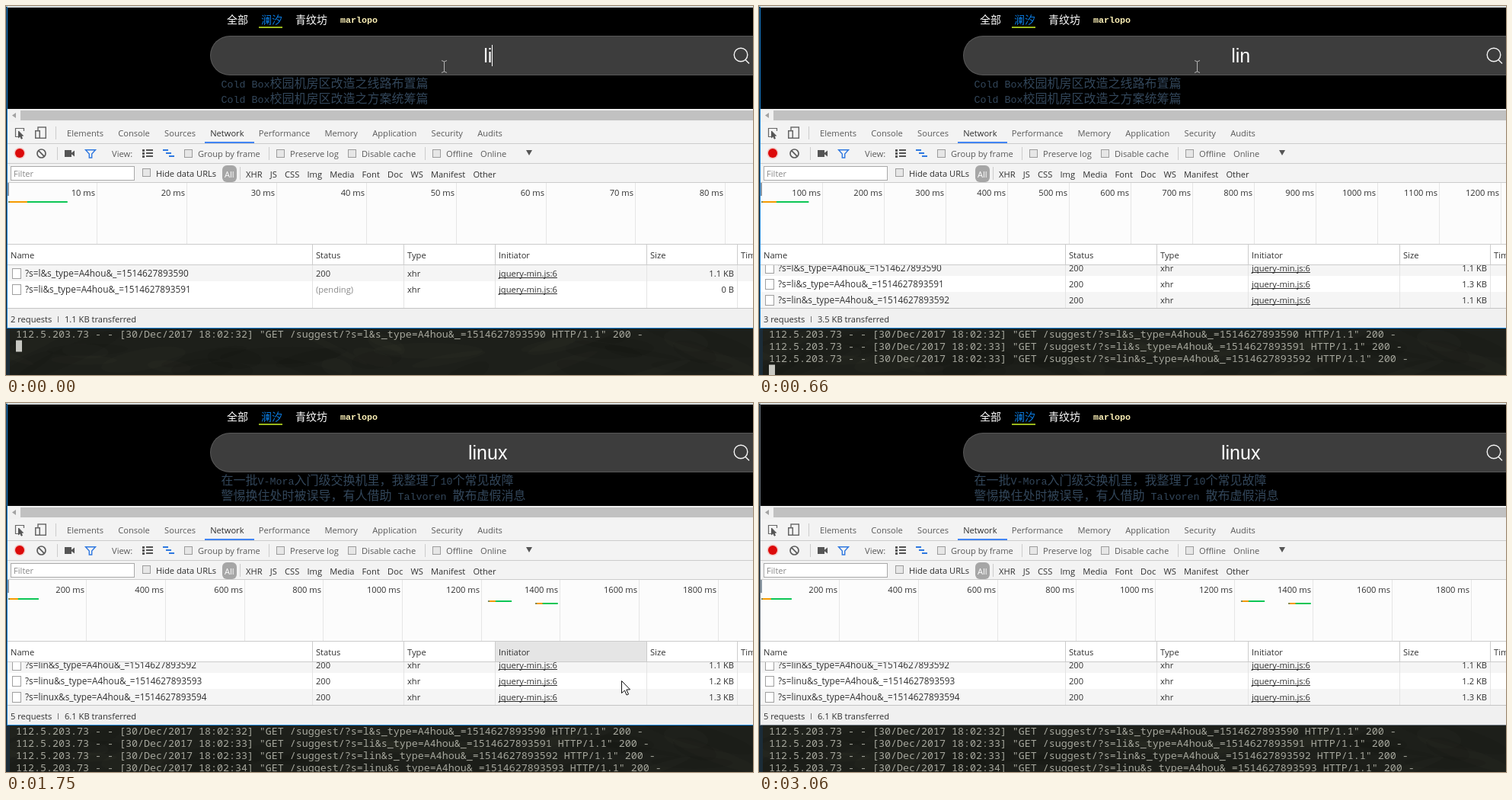
These frames come from a looping animation (981x484 px, 3.11 s). An HTML page with a canvas:

```html
<!DOCTYPE html>
<html lang="zh">
<head>
<meta charset="utf-8">
<title>Live search requests</title>
<style>
html, body { margin: 0; width: 100%; height: 100%; overflow: hidden; background: #000; }
canvas { display: block; }
</style>
</head>
<body>
<canvas id="stage" width="981" height="484"></canvas>
<script>
const c = document.getElementById('stage').getContext('2d');
const W = 981, H = 484, LOOP = 3110, BLUR = 3060;
const UI = '11.15px "Open Sans", "Noto Sans", sans-serif';
const QUERY = UI.replace('11.15', '11.8');
const MONO = '13.33px "Noto Sans Mono", "DejaVu Sans Mono", monospace';
const INK = '#303030', DIM = '#5a5a5a', LINE = '#cccccc', BLUE = '#2f78e0';

const WORD = 'linux';
const SIZES = [1.1, 1.3, 1.1, 1.22, 1.34];
const KEYS = [140, 710, 790], REPLIES = [50, 200, 750, 830];
const BLINK = 520, ROW = 21, LIST = 56;
const TITLES = [
  ['Cold Box校园机房区改造之线路布置篇', 'Cold Box校园机房区改造之方案统筹篇'],
  ['在一批V-Mora入门级交换机里，我整理了10个常见故障', '警惕换住处时被误导，有人借助 Talvoren 散布虚假消息']
];

const passed = (times, t) => times.filter(at => at <= t);

function stateAt(t) {
  const keys = passed(KEYS, t);
  const done = 1 + passed(REPLIES, t).length;
  const sinceKey = t - (keys.pop() || 0);
  return {
    done,
    typed: 2 + passed(KEYS, t).length,
    log: t < 230 ? 1 : t < 1230 ? 3 : 5,
    titles: t >= 830 || (t >= 100 && t < 200) ? 1 : 0,
    scroll: done > 2 ? ROW * done - LIST : 0,
    caret: t < BLUR && Math.floor(sinceKey / BLINK) % 2 === 0
  };
}

// The hand eases out from the search box towards the bottom edge
function pointerAt(t) {
  const u = Math.min(1, Math.max(0, (t - 1600) / 500));
  const p = 1 - (1 - u) ** 3;
  return [575 + 355 * p, 79 + 434 * p];
}

function seeded(seed) {
  return () => (seed = seed * 16807 % 2147483647) / 2147483647;
}

function box(x, y, w, h, color) {
  c.fillStyle = color;
  c.fillRect(x, y, w, h);
}

function text(s, x, y, color = INK, font = UI, align = 'left') {
  c.font = font;
  c.fillStyle = color;
  c.textAlign = align;
  c.fillText(s, x, y);
  return c.measureText(s).width;
}

// Words set one after another with an even gap
function flow(words, x, y, gap, color) {
  for (const s of words.split(' ')) x += text(s, x, y, color(s)) + gap;
}

function trace(points, close) {
  c.beginPath();
  points.forEach(p => c.lineTo(...p));
  if (close) c.closePath();
}

function stroke(points, color, width = 1, close = false) {
  trace(points, close);
  c.strokeStyle = color;
  c.lineWidth = width;
  c.stroke();
}

function fill(points, color) {
  trace(points, true);
  c.fillStyle = color;
  c.fill();
}

function ring(x, y, r, color, width) {
  c.beginPath();
  c.arc(x, y, r, 0, Math.PI * 2);
  c.strokeStyle = color;
  c.lineWidth = width;
  c.stroke();
}

function disc(x, y, r, color) {
  c.beginPath();
  c.arc(x, y, r, 0, Math.PI * 2);
  c.fillStyle = color;
  c.fill();
}

function pill(x, y, w, h, r, color) {
  c.beginPath();
  c.roundRect(x, y, w, h, r);
  c.fillStyle = color;
  c.fill();
}

function frame(x, y, w, h, edge, inner = '#fff') {
  box(x, y, w, h, edge);
  box(x + 1, y + 1, w - 2, h - 2, inner);
}

function checkbox(x, y, label, color, base) {
  frame(x, y, 11, 11, '#9c9c9c', '#e6e6e6');
  text(label, x + 18, base, color);
}

function clipped(x, y, w, h, draw) {
  c.save();
  c.beginPath();
  c.rect(x, y, w, h);
  c.clip();
  draw();
  c.restore();
}

function arrow(x, y, size, inner, edge) {
  const shape = [[0, 0], [0, 16], [4, 12.5], [6.5, 18.5], [9, 17.5], [6.3, 11.5], [11, 11.3]]
    .map(([dx, dy]) => [x + dx * size, y + dy * size]);
  fill(shape, inner);
  stroke(shape, edge, 1, true);
}

// Latin letters take half the width of a Chinese one
function mixed(s, x, y, size, color, weight = '') {
  for (const part of s.split(/([\x20-\x7e]+)/).filter(Boolean)) {
    const latin = part.charCodeAt(0) < 128;
    const font = latin
      ? `${weight} ${size / 1.2}px "Liberation Mono", monospace`
      : `${weight} ${size}px "Noto Sans CJK SC", "Noto Sans CJK", sans-serif`;
    text(part, x, y, color, font);
    x += part.length * size / (latin ? 2 : 1);
  }
}

function drawPage(s) {
  box(2, 2, W, 134, '#000');
  mixed('全部', 290, 23, 14, '#fff', '500');
  mixed('澜汐', 335, 23, 14, '#0a7be0', '500');
  mixed('青纹坊', 380, 23, 14, '#fff', '500');
  mixed('marlopo', 439, 22, 14, '#fff3b8', 'bold');
  box(332, 27, 31, 2, '#9ab81c');

  pill(268, 39, 760, 52, 26, '#585858');
  pill(269, 40, 760, 50, 25, '#3d3d3d');
  const mid = 632.7;
  const width = text(WORD.slice(0, s.typed), mid, 74, '#fff', '25px "Liberation Sans", Arial, sans-serif', 'center');
  if (s.caret) box(Math.floor(mid + width / 2), 51, 1, 28, '#fff');
  ring(965, 64, 8.8, '#f4f4f4', 1.4);
  stroke([[971, 70.5], [976, 75.5]], '#f4f4f4', 1.5);
  TITLES[s.titles].forEach((line, i) => mixed(line, 282.5, 107 + 20 * i, 16, '#32465a'));

  box(2, 135, W, 17, '#f1f1f1');
  box(19, 137, W, 13, '#c1c1c1');
  fill([[8, 143.5], [13, 140], [13, 147]], '#a3a3a3');
}

function drawIcons() {
  stroke([[17, 171.5], [12.5, 171.5], [12.5, 160.5], [23.5, 160.5], [23.5, 164]], '#666', 1.2);
  arrow(16.5, 164, 0.55, '#555', '#555');
  c.strokeStyle = '#666';
  c.lineWidth = 1.4;
  c.strokeRect(42, 159, 10.3, 14.3);
  box(38, 163, 7, 11, '#666');
  box(39.5, 164.5, 4, 8, '#f3f3f3');

  disc(18, 193, 7.5, '#f3c9c6');
  disc(18, 193, 6, '#dc0a0a');
  ring(46.5, 193.5, 5.5, '#5c5c5c', 1.7);
  stroke([[42.7, 189.7], [50.3, 197.3]], '#5c5c5c', 1.7);
  box(77, 189, 9, 9, '#555');
  fill([[85, 193.5], [90, 189.5], [90, 197.5]], '#555');
  stroke([[104.5, 188.7], [117.5, 188.7], [112.7, 194], [112.7, 199], [109.3, 199], [109.3, 194]], BLUE, 1.4, true);
  for (let i = 0; i < 3; i++) {
    const y = 188 + 4 * i;
    box(179, y, 3, 3, '#555');
    box(184, y, 9, 2, '#555');
    box(206 + 4 * i, y, 7, 2, BLUE);
  }
  fill([[683, 189], [691, 189], [687, 196]], '#555');
}

function drawToolbar() {
  box(2, 152, W, 80, '#f3f3f3');
  for (const y of [180, 206, 231]) box(2, y, W, 1, LINE);
  flow('Elements Console Sources Network Performance Memory Application Security Audits', 80, 171, 19.2,
    s => s === 'Network' ? INK : DIM);
  box(261, 178, 65, 2, '#4285f4');
  box(65, 158, 1, 17, LINE);
  for (const x of [67, 345, 550]) box(x, 185, 1, 17, LINE);
  drawIcons();

  text('View:', 139, 198, DIM);
  checkbox(234, 188, 'Group by frame', DIM, 198);
  checkbox(355, 188, 'Preserve log', DIM, 198);
  checkbox(449, 188, 'Disable cache', DIM, 198);
  checkbox(560, 188, 'Offline', DIM, 198);
  text('Online', 623, 198, DIM);

  frame(6, 210, 163, 19, '#a9a9a9');
  text('Filter', 10, 224, '#8a8a8a');
  checkbox(179, 213, 'Hide data URLs', INK, 224);
  pill(284, 209, 19, 22, 6, '#a6a6a6');
  text('All', 287, 225, '#fff');
  box(307, 211, 1, 17, LINE);
  flow('XHR JS CSS Img Media Font Doc WS Manifest Other', 315, 225, 10.2, () => INK);
}

function drawTimeline({ done }) {
  const [step, unit] = done < 2 ? [117.85, 10] : done < 4 ? [81, 100] : [103.7, 200];
  const px = ms => ms * step / unit;
  box(2, 232, W, 80, '#fcfcfc');
  for (let i = 1; i * step < W; i++) {
    const x = Math.floor(2 + i * step);
    box(x, 232, 1, 80, '#e6e6e6');
    text(`${i * unit} ms`, x - 2, 249, INK, UI, 'right');
  }
  box(2, 232, 2, 17, '#8a97a3');

  // start and length of each burst in ms; a third of it is waiting
  const bursts = [[0, done < 2 ? 6.6 : 77], [1215, 60], [1335, 57]];
  bursts.slice(0, Math.max(1, done - 2)).forEach(([at, ms], i) => {
    const x = 3 + px(at), w = px(ms), y = 256 + 3 * i;
    box(x, y, w, 2, '#0cc655');
    box(x, y, w * 0.32, 2, '#f59a00');
    box(x, y, 2, 2, '#7d8a5a');
  });
}

function requestName(i) {
  return `?s=${WORD.slice(0, i + 1)}&s_type=A4hou&_=151462789359${i}`;
}

function drawRow(i, y, ready) {
  const base = y + 15, script = 'jquery-min.js:6';
  if (i % 2 === 0) box(2, y, W, ROW, '#f5f5f5');
  frame(8, y + 4, 12, 14, '#a0a0a0');
  text(requestName(i), 25, base, INK, QUERY);
  text(ready ? '200' : '(pending)', 407, base, ready ? INK : '#8a8a8a');
  text('xhr', 527, base);
  box(647, base + 1, text(script, 647, base), 1, INK);
  text(ready ? `${SIZES[i].toFixed(1)} KB` : '0 B', 956, base, INK, UI, 'right');
}

function drawTable(s, hover) {
  const cols = [402, 522, 642, 841, 960];
  box(2, 312, W, 28, LINE);
  box(2, 313, W, 26, '#fff');
  if (hover) box(643, 313, 198, 26, '#e5e5e5');
  'Name Status Type Initiator Size Time'.split(' ')
    .forEach((name, i) => text(name, i ? cols[i - 1] + 5 : 6, 331));
  clipped(2, 340, W, LIST, () => {
    box(2, 340, W, LIST, '#fff');
    for (let i = 0; i < s.typed; i++) drawRow(i, 340 + ROW * i - s.scroll, i < s.done);
  });
  for (const x of cols) {
    box(x, 313, 1, 26, LINE);
    box(x, 340, 1, LIST, '#e4e4e4');
  }

  const total = SIZES.slice(0, s.done).reduce((a, b) => a + b);
  box(2, 396, W, 26, '#f0f0f0');
  box(2, 396, W, 1, '#c4c4c4');
  text(`${s.typed} requests`, 6, 415);
  box(68, 407, 1, 8, '#777');
  text(`${total.toFixed(1)} KB transferred`, 77, 415);
}

function drawTerminal(s) {
  const rnd = seeded(11);
  clipped(5, 423, W, 61, () => {
    box(5, 423, W, 61, '#1d1f1a');
    for (let i = 0; i < 40; i++) {
      c.beginPath();
      c.ellipse(rnd() * W, 430 + rnd() * 60, 20 + rnd() * 60, 4 + rnd() * 10, rnd() - 0.5, 0, Math.PI * 2);
      c.fillStyle = i % 2 ? 'rgba(0,0,0,.08)' : 'rgba(90,90,65,.06)';
      c.fill();
    }
    for (let i = 0; i < s.log; i++) {
      const time = `30/Dec/2017 18:02:${32 + Math.ceil(i / 2)}`;
      text(`112.5.203.73 - - [${time}] "GET /suggest/${requestName(i)} HTTP/1.1" 200 -`,
        13, 435 + 16 * i, '#a6a79d', MONO);
    }
    box(13, 422.5 + 16 * s.log, 8, 15, '#c8c8c2');
  });
}

function drawPointer(t) {
  if (t >= 1630) {
    const held = 1630 + Math.floor((t - 1630) / 60) * 60;
    const [x, y] = pointerAt(held).map(Math.round);
    arrow(x + 0.5, y + 0.5, 1, '#fff', '#111');
    return;
  }
  for (const [y, turn] of [[71.5, 1], [87.5, -1]]) {
    stroke([[572, y], [575.5, y + 1.5 * turn], [579, y]], '#b5b5b5');
  }
  stroke([[575.5, 73], [575.5, 86]], '#b5b5b5');
}

function drawWindowEdge(t) {
  const edge = t < BLUR ? '#1883d7' : '#6b7680';
  box(0, 0, W, 1, '#c4d0d2');
  box(1, 1, W, 1, '#f2f2f2');
  box(1, 1, 1, 422, edge);
  box(1, 422, W, 1, edge);
}

function draw(t) {
  const s = stateAt(t);
  const [hx, hy] = pointerAt(t - (t - 1630) % 60 - 30);
  box(0, 0, W, H, '#1b2c38');
  drawPage(s);
  drawToolbar();
  drawTimeline(s);
  drawTable(s, hx > 642 && hx < 841 && hy > 312 && hy < 340);
  drawTerminal(s);
  drawWindowEdge(t);
  drawPointer(t);
}

const start = performance.now();
function tick() {
  draw((performance.now() - start) % LOOP);
  requestAnimationFrame(tick);
}
tick();
</script>
</body>
</html>
```
